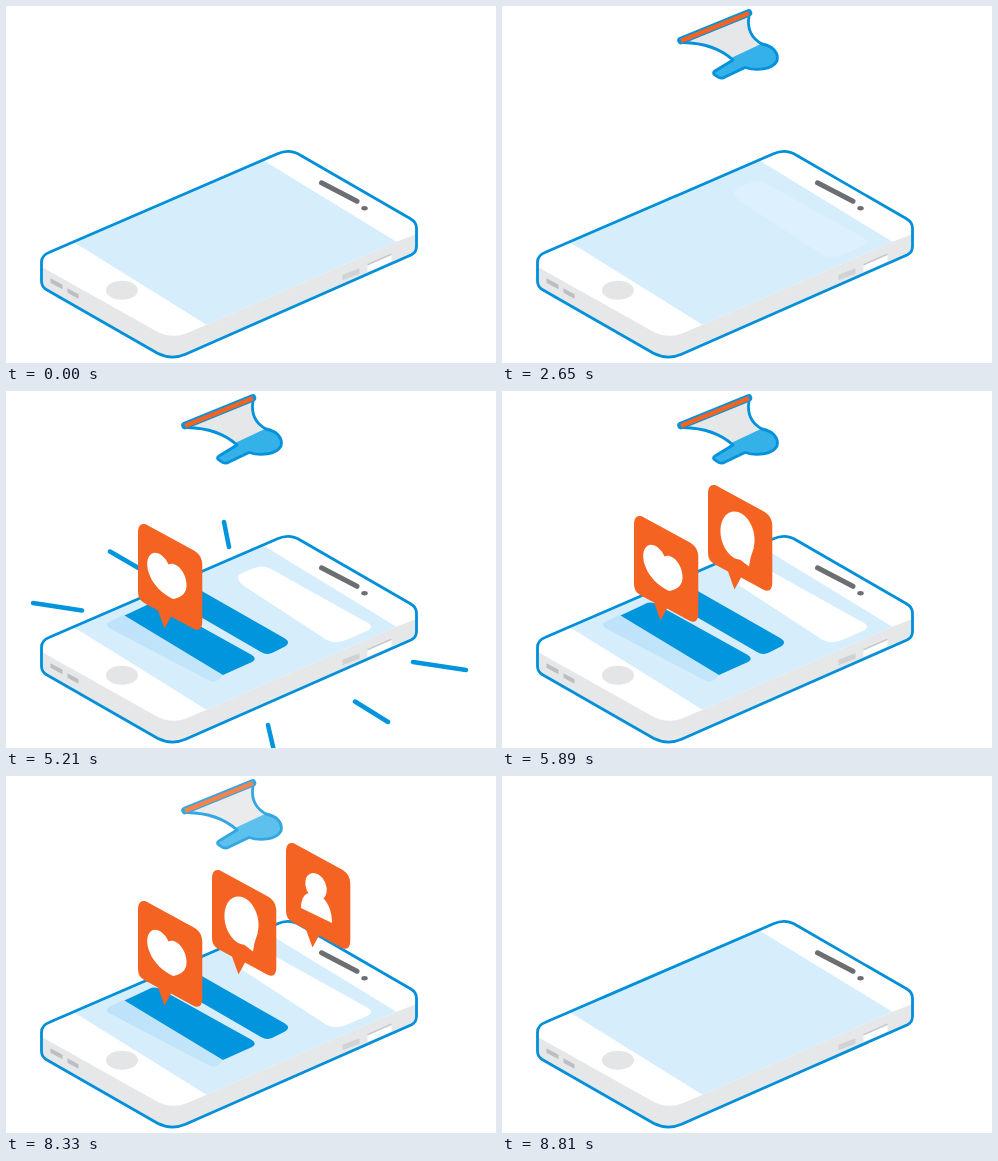
These frames come from a looping animation (490x357 px, 8840 ms). An HTML page:

```html
<!DOCTYPE html>
<html lang="en">
<head>
<meta charset="utf-8">
<title>Phone notifications</title>
<style>
  html, body { margin: 0; width: 100%; height: 100%; overflow: hidden; background: #fff; }
  svg { display: block; width: 100vw; height: 100vh; }
</style>
</head>
<body>
<svg viewBox="0 0 490 357">
  <defs>
    <path id="case" d="M36 257Q36 250 44 247L272 148.500Q284 143 295 150L405 213.500Q411 217 411 223V241Q411 247 406 249.500L180 349Q166 355 152 348L42 285Q36 282 36 276Z"/>
    <clipPath id="inside"><use href="#case"/></clipPath>
    <linearGradient id="fade" gradientUnits="userSpaceOnUse" x1="105" y1="232" x2="218" y2="288">
      <stop offset="0" stop-color="#bde2f9"/>
      <stop offset="1" stop-color="#c4e6fa"/>
    </linearGradient>
    <path id="card" d="M132 134C132 126 136 123 142 126.500L187 151C193 154 196.300 159 196.300 166V222C196.300 230 193 232.500 187 229.500L165 217.500L158.500 229.500L152 211.500L139 204.500Q132 201 132 193Z" fill="#f56322"/>
  </defs>

  <g id="phone" transform="translate(-.5 -.7)">
    <g clip-path="url(#inside)">
      <path d="M30 140H420V360H30Z" fill="#fff"/>
      <path d="M260 156.500L391 236.500L201 319.500L70 238L66 233L255 151Z" fill="#d6eefc"/>
      <path d="M30 258L151 326Q166 334 181 328L201 319.500L391 236.500L420 225V360H30Z" fill="#e6e7e8"/>
    </g>
    <ellipse cx="116.500" cy="285" rx="16" ry="9.500" fill="#e4e5e6"/>
    <path d="M45 273L57 279.500V284L45 277.500ZM62 283L73 289V293.500L62 287.500Z" fill="#bcbec0"/>
    <path d="M337 269.500L354 263V268.500L337 275Z" fill="#d0d2d3"/>
    <path d="M362 259.500L386 249V256L362 266.500Z" fill="#fff"/>
    <path d="M362 259.500L386 249" stroke="#c7c9cb" stroke-width="1.500"/>
    <path d="M316 177.500L351.500 196" stroke="#6d6e71" stroke-width="5" stroke-linecap="round"/>
    <ellipse cx="359" cy="203" rx="3.200" ry="2.200" fill="#6d6e71"/>
    <use href="#case" fill="none" stroke="#0090da" stroke-width="2.800"/>
  </g>

  <path id="msg1" fill="#fff" d="M236 182L247 177.500Q256 173.500 264 177.500L361 231.500Q369 236 361 240L340 249Q329 253.500 320 248.500L238 195Q227 186 236 182Z"/>
  <path id="msg2" fill="#0095dd" d="M167 204L180 198Q187 195 194 199L279 247.500Q285 251.500 279 255.500L267 261.500Q261 264.500 255 261L167 210Q161 207 167 204Z"/>
  <g id="msg3">
    <path fill="url(#fade)" d="M104 230.500L122 222L218 283L212 289Q208 292.500 202 289L103 237Q98 233.500 104 230.500Z"/>
    <path fill="#0095dd" d="M118.500 224.500L143 213Q149 210 155 213.500L245 263.500Q252 267.500 246 271L217 284Z"/>
  </g>

  <path id="rays" visibility="hidden" fill="none" stroke="#0095dd" stroke-width="4.500" stroke-linecap="round"
    d="M27 212L76 219.500M104 160.500L135 178.500M218 131L223 156M407 271L460 279M349 310.500L382 331M262 334L268 360"/>

  <g id="pin1">
    <use href="#card"/>
    <path fill="#fff" d="M162.500 165.500C159 157 151 152 146 154.500C140 158 140 168 144 177C148 187 157 195 167 200C176 198.500 181 194 180.500 185C180 173 170 162 162.500 165.500Z"/>
  </g>
  <g id="pin2">
    <use href="#card" x="74" y="-31"/>
    <ellipse cx="235.500" cy="144.500" rx="16.500" ry="24.500" transform="rotate(-14 235.500 144.500)" fill="#fff"/>
    <path fill="#fff" d="M252 156L248.500 167L247 175.500L236 167Z"/>
  </g>
  <g id="pin3">
    <use href="#card" x="148" y="-58"/>
    <ellipse cx="310" cy="110.500" rx="10" ry="14" transform="rotate(-24 310 110.500)" fill="#fff"/>
    <path fill="#fff" d="M295 132C295 122 299 117 304 117L316 121C323 127 326 137 326 147Z"/>
  </g>

  <g id="horn" stroke-linejoin="round" stroke-linecap="round">
    <path fill="#e6e7e8" d="M181 36C202 36 219 43 231 54L260 39C249 32 245 22 247 10Z"/>
    <path fill="#35b1e9" d="M229 52L260 37.500C272 39 278 48 275 56C270 64 254 65 243 61L220 72L212 67L231 54Z"/>
    <path fill="none" stroke="#0092dc" stroke-width="2.800" d="M181 36.500C202 37 219 43 231 54L213 65Q210 67 213 69L217 71.500Q220 73 223 71L243 61.500C254 65 270 64 275 55C277 47 271 40 260 38C249 32 245 22 247 10"/>
    <path fill="none" stroke="#0092dc" stroke-width="7.500" d="M179 34.500L246.500 7"/>
    <path fill="none" stroke="#f56322" stroke-width="4.500" stroke-linecap="butt" d="M179 34.800L247 7.200"/>
  </g>
</svg>
<script>
  const LOOP = 8840, TICK = 30;
  const names = ['horn', 'msg1', 'msg2', 'msg3', 'pin1', 'pin2', 'pin3'];
  const parts = names.map(id => document.getElementById(id));
  const rays = document.getElementById('rays');

  // start and tick count of each fade in
  const enter = [[630, 4], [2650, 7], [3190, 6], [3940, 5], [5030, 5], [5560, 5], [6090, 5]];
  const flashes = [[4830, 5240], [5540, 5890], [6240, 6600]];

  const ramp = (t, start, n) =>
    Math.max(0, Math.min(1, (Math.floor((t - start) / TICK) + 1) / n));

  function lift(i, t) {
    if (i === 0) return 189 * (1 - ramp(t, 1690, 12));
    if (i > 3) return 22 * (1 - ramp(t, enter[i][0], 11));
    return 0;
  }

  function draw(t) {
    parts.forEach((el, i) => {
      const [start, n] = enter[i];
      const leave = ramp(t, 8330 + i * 60, 5);
      el.setAttribute('opacity', ramp(t, start, n) * (1 - leave));
      el.setAttribute('transform', `translate(0 ${lift(i, t)})`);
    });
    const lit = flashes.some(([a, b]) => t >= a && t < b);
    rays.setAttribute('visibility', lit ? 'visible' : 'hidden');
  }

  const origin = performance.now();
  function frame() {
    draw((performance.now() - origin) % LOOP);
    requestAnimationFrame(frame);
  }
  draw(0);
  requestAnimationFrame(frame);
</script>
</body>
</html>
```
